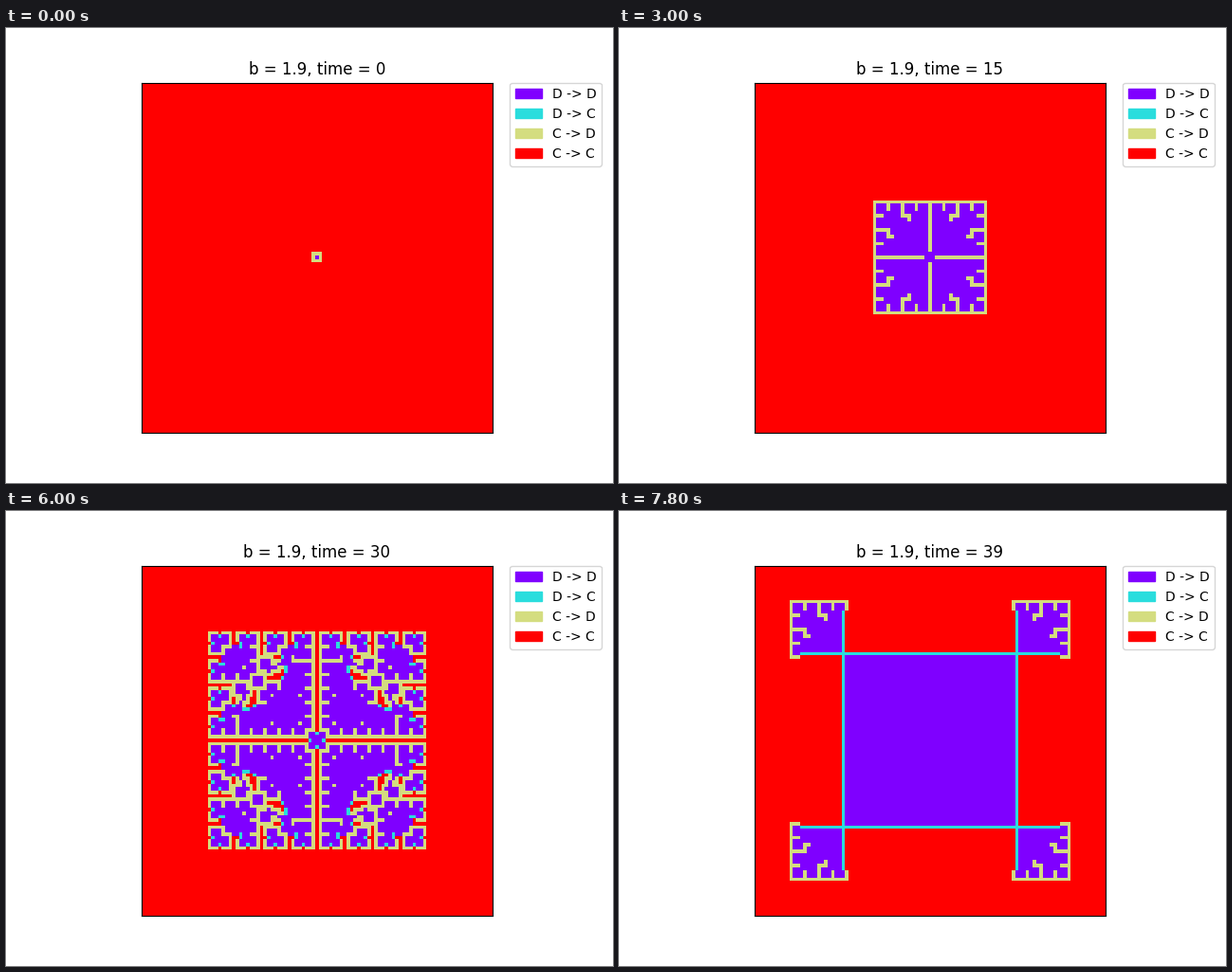
Recreate the animation shown at these times as a matplotlib script. Size 640 by 480 pixels, loop 8000 ms.

```python
import numpy as np
import matplotlib.pyplot as plt
from matplotlib.animation import FuncAnimation
from matplotlib.patches import Patch

SIZE = 101
STEPS = 40
B = 1.9
LABELS = ["D -> D", "D -> C", "C -> D", "C -> C"]


def neighbourhood(grid):
    """Stack the nine shifted copies of a grid, each cell included."""
    return np.array([np.roll(grid, (dy, dx), (0, 1))
                     for dy in (-1, 0, 1) for dx in (-1, 0, 1)])


def evolve(coop):
    """Each cell copies the best scoring strategy around it (1 = C, 0 = D)."""
    partners = neighbourhood(coop).sum(axis=0)
    score = np.where(coop == 1, partners, B * partners)
    best_c = neighbourhood(np.where(coop == 1, score, -1)).max(axis=0)
    best_d = neighbourhood(np.where(coop == 0, score, -1)).max(axis=0)
    return (best_c > best_d).astype(int)


def transitions():
    coop = np.ones((SIZE, SIZE), dtype=int)
    coop[SIZE // 2, SIZE // 2] = 0
    history = []
    for _ in range(STEPS):
        new = evolve(coop)
        history.append(2 * coop + new)
        coop = new
    return history


history = transitions()
cmap = plt.get_cmap("rainbow", 4)

fig, ax = plt.subplots(figsize=(6.4, 4.8), dpi=100)
image = ax.imshow(history[0], cmap=cmap, vmin=0, vmax=3,
                  interpolation="nearest")
ax.set_xticks([])
ax.set_yticks([])
title = ax.set_title("")
ax.legend(handles=[Patch(color=cmap(i), label=s) for i, s in enumerate(LABELS)],
          loc="upper left", bbox_to_anchor=(1.05, 1), borderaxespad=0)


def draw(t):
    image.set_data(history[t])
    title.set_text(f"b = {B}, time = {t}")
    return image, title


anim = FuncAnimation(fig, draw, frames=STEPS, interval=200,
                     init_func=lambda: draw(0), repeat=True, repeat_delay=0)
plt.show()
```
